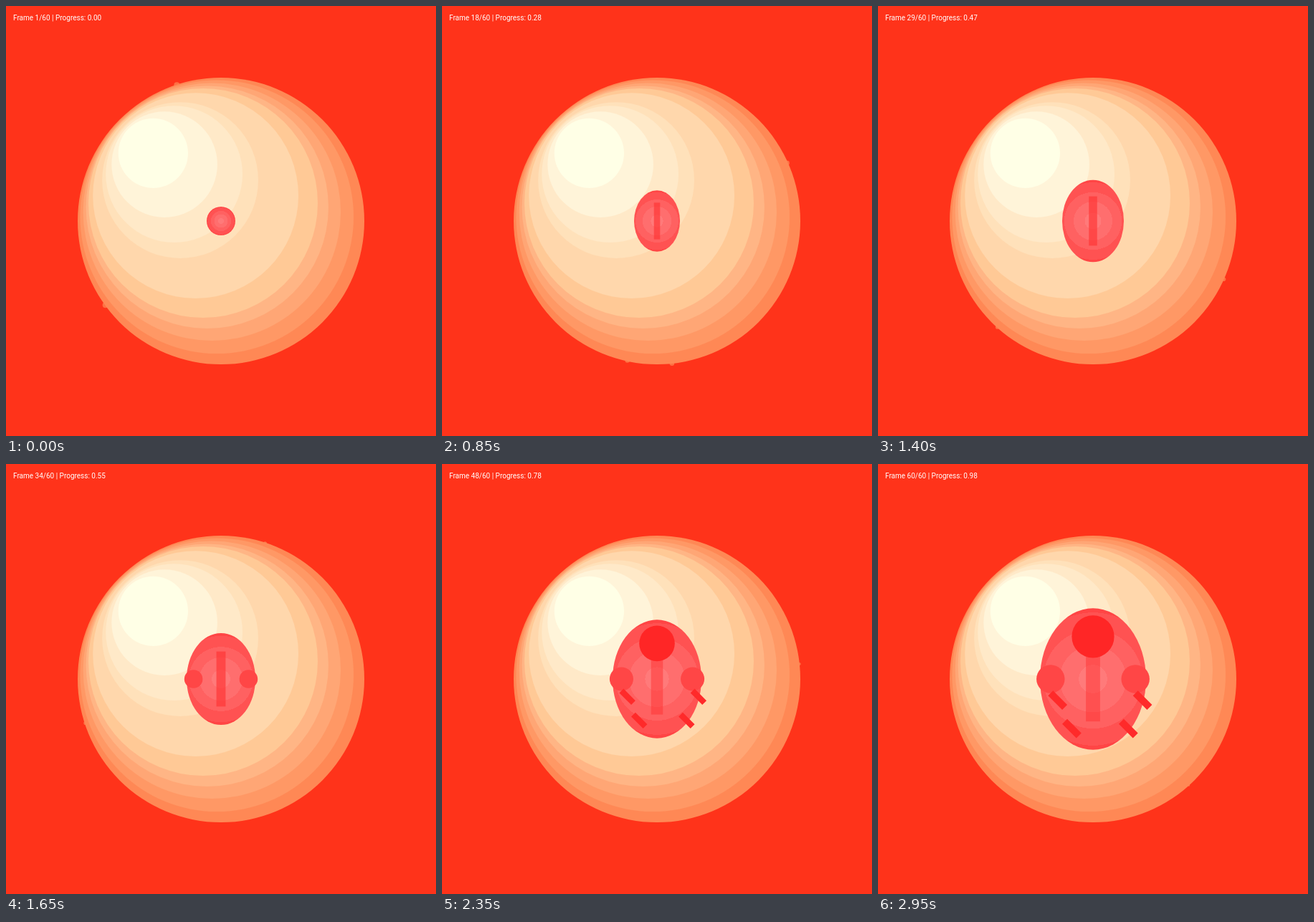
Recreate the animation shown at these times as an HTML page with a canvas. Size 600x600 px, loop 3000 ms.

```html
<!DOCTYPE html>
<html lang="en">
<head>
<meta charset="utf-8">
<title>Growth</title>
<style>
  html, body { margin: 0; width: 100%; height: 100%; overflow: hidden; background: #ff331a; }
  canvas, svg { position: absolute; left: 0; top: 0; width: 600px; height: 600px; }
  text { font: 10px Roboto, "Liberation Sans", sans-serif; fill: #fff; }
</style>
</head>
<body>
<canvas id="stage" width="600" height="600"></canvas>
<svg viewBox="0 0 600 600"><text id="label" x="10" y="20"></text></svg>
<script>
const FRAMES = 60, STEP = 50, MID = 300, TAU = Math.PI * 2;
const ctx = document.getElementById('stage').getContext('2d');
const label = document.getElementById('label');

// Shaded sphere: radius and colour of each band, outermost first
const SPHERE = [
  [200, '#ff8855'], [190.8, '#ff9865'], [179.7, '#ffa675'], [169.2, '#ffb585'],
  [160, '#ffc996'], [143.4, '#ffd7ac'], [108.9, '#ffe1ba'], [95.4, '#ffe9c8'],
  [73.8, '#fff4d9'], [48.6, '#ffffe6']
];

// Body tones from the centre outwards: outer limit and colour
const BODY = [
  [0.2, '#ff7a7a'], [0.47, '#ff6e6e'], [0.7, '#ff6161'], [0.94, '#ff5252'], [1, '#ff4545']
];

function oval(x, y, rx, ry, fill) {
  ctx.fillStyle = fill;
  ctx.beginPath();
  ctx.ellipse(x, y, rx, ry, 0, 0, TAU);
  ctx.fill();
}

const disc = (x, y, r, fill) => oval(x, y, r, r, fill);

function drawDots(i, p) {
  for (let k = 0; k < 20; k++) {
    const angle = TAU * (k / 20 + p);
    const dist = 150 + 50 * Math.sin(k + i * 0.08);
    disc(MID + dist * Math.cos(angle), MID + dist * Math.sin(angle), 4 - 2.5 * p, '#ff7043');
  }
}

function drawSphere() {
  for (const [r, fill] of SPHERE) {
    const c = MID - 0.625 * (200 - r);
    disc(c, c, r, fill);
  }
}

function drawBody(p) {
  const s = 20 + 80 * p;
  const at = k => MID + k * s;
  const tones = ctx.createRadialGradient(MID, MID, 0, MID, MID, s);
  let from = 0;
  for (const [to, color] of BODY) {
    tones.addColorStop(from, color);
    tones.addColorStop(to, color);
    from = to;
  }
  oval(MID, MID, p < 0.25 ? s : 0.75 * s, s, tones);

  if (p >= 0.25) {
    ctx.fillStyle = `rgba(255, 51, 51, ${p < 0.75 ? 0.65 : 0.5})`;
    ctx.fillRect(at(-0.1), at(-0.6), 0.2 * s, 1.2 * s);
  }
  if (p >= 0.5) {
    for (const side of [-0.6, 0.6]) disc(at(side), MID, 0.2 * s, '#ff4646');
  }
  if (p >= 0.75) {
    disc(MID, at(-0.6), 0.3 * s, '#ff2626');
    ctx.strokeStyle = '#ff2a2a';
    ctx.lineWidth = 0.1 * s;
    ctx.beginPath();
    for (const [x, y] of [[-0.6, 0.2], [0.6, 0.2], [-0.4, 0.6], [0.4, 0.6]]) {
      ctx.moveTo(at(x), at(y));
      ctx.lineTo(at(x + 0.2), at(y + 0.2));
    }
    ctx.stroke();
  }
}

function draw(i) {
  const p = i / FRAMES;
  ctx.fillStyle = '#ff331a';
  ctx.fillRect(0, 0, 600, 600);
  drawDots(i, p);
  drawSphere();
  drawBody(p);
  label.textContent = `Frame ${i + 1}/${FRAMES} | Progress: ${p.toFixed(2)}`;
}

const start = performance.now();
function tick() {
  const elapsed = Math.max(0, performance.now() - start);
  draw(Math.floor(elapsed / STEP) % FRAMES);
  requestAnimationFrame(tick);
}
tick();
</script>
</body>
</html>
```
